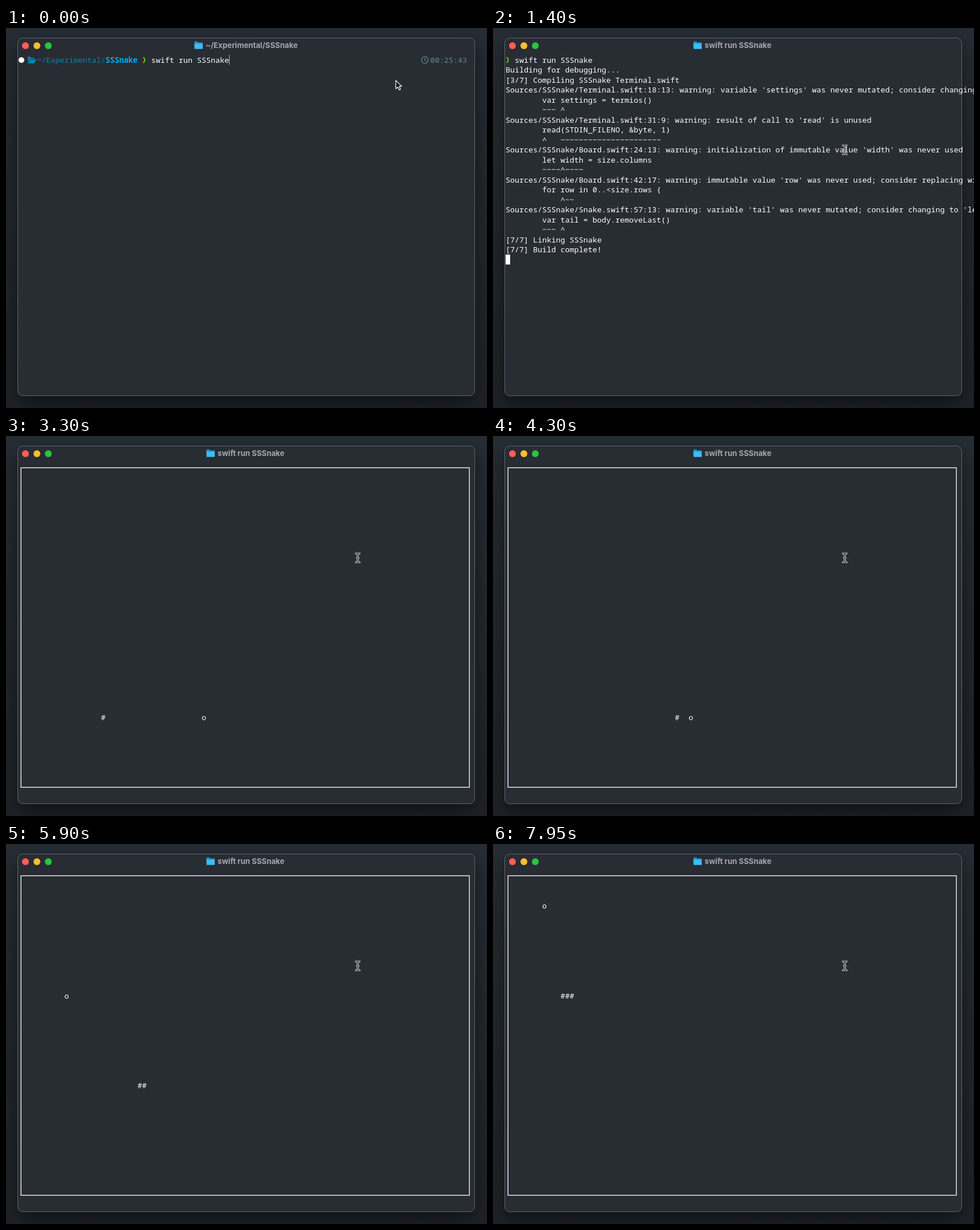
These frames come from a looping animation (841x666 px, 8 s). An HTML page with a canvas:

```html
<!DOCTYPE html>
<html lang="en">
<head>
<meta charset="utf-8">
<title>Terminal snake</title>
<style>
  html, body { margin: 0; width: 100%; height: 100%; overflow: hidden; background: #1f2429; }
  canvas { display: block; }
</style>
</head>
<body>
<canvas id="stage" width="841" height="666"></canvas>
<script>
const ctx = document.getElementById('stage').getContext('2d');
const LOOP = 8000, TICK = 50, STEP = 52.75;
const CELL_W = 8, CELL_H = 17.5, LEFT = 22, BASE = 60.7;
const MONO = '13.333px "Noto Sans Mono", monospace';
const UI = '700 13.2px Inter, sans-serif';
const BLUE = '#0087af', GREEN = '#5fd700', TEAL = '#5f8787';

const colX = col => LEFT + col * CELL_W;

function text(string, col, row, color = '#fff', weight = '') {
  ctx.font = `${weight} ${MONO}`;
  ctx.fillStyle = color;
  ctx.fillText(string, colX(col), BASE + row * CELL_H);
}

function rounded(x, y, w, h, r) {
  ctx.beginPath();
  ctx.roundRect(x, y, w, h, r);
}

function dot(x, y, r, color) {
  ctx.fillStyle = color;
  ctx.beginPath();
  ctx.arc(x, y, r, 0, Math.PI * 2);
  ctx.fill();
}

function line(path, color, width) {
  ctx.strokeStyle = color;
  ctx.lineWidth = width;
  ctx.stroke(new Path2D(path));
}

function fill(path, color) {
  ctx.fillStyle = color;
  ctx.fill(new Path2D(path));
}

function drawWindow() {
  const desk = ctx.createLinearGradient(0, 0, 0, 666);
  desk.addColorStop(0, '#262d34');
  desk.addColorStop(1, '#1f2327');
  ctx.fillStyle = desk;
  ctx.fillRect(0, 0, 841, 666);

  ctx.save();
  ctx.shadowColor = 'rgba(0,0,0,.55)';
  ctx.shadowBlur = 36;
  ctx.shadowOffsetY = 12;
  ctx.fillStyle = '#282c33';
  rounded(20.5, 17.5, 799, 627, 9);
  ctx.fill();
  ctx.restore();
  ctx.strokeStyle = '#62676b';
  ctx.lineWidth = 1;
  ctx.stroke();

  ['#ff5f57', '#febc2e', '#28c840'].forEach((color, i) => dot(34 + 20 * i, 31, 6, color));
}

function drawTitle(title, x) {
  ctx.save();
  ctx.translate(x - 19.5, 23.5);
  fill('M0 1.5Q0 0 1.5 0H5L6.5 1.7H13Q14.5 1.7 14.5 3V8H0Z', '#1a95d6');
  fill('M0 4H14.5V12Q14.5 13.3 13.2 13.3H1.3Q0 13.3 0 12Z', '#43b9f2');
  ctx.restore();
  ctx.font = UI;
  ctx.fillStyle = '#a5a8ab';
  ctx.fillText(title, x, 35);
}

function chevron(col) {
  ctx.save();
  ctx.translate(colX(col), 0);
  line('M2 51.5Q5.6 54 4.4 56Q5 58.5 2 61', GREEN, 1.9);
  ctx.restore();
}

function blockCursor(col, row) {
  ctx.fillStyle = '#fff';
  ctx.fillRect(colX(col), 47 + row * CELL_H, CELL_W, CELL_H);
}

function drawPrompt(showCaret) {
  dot(27, 56.3, 5, '#fff');
  fill('M38 60V51.5Q38 50.3 39.2 50.3H42.5L44 52H48.3Q49.5 52 49.5 53.2V54H42Q41 54 40.4 55Z', BLUE);
  fill('M41.5 55H53L50 61Q49.5 62 48.5 62H38Z', BLUE);
  text('~', 4, 0, BLUE, '700');
  text('/Experimental/', 5, 0, BLUE);
  text('SSSnake', 19, 0, '#00afff', '700');
  chevron(27);
  text('swift run SSSnake', 29, 0);
  line('M738.3 56A5.8 5.8 0 1 1 726.7 56A5.8 5.8 0 1 1 738.3 56M732.5 52V56.5L735.5 58', TEAL, 1.3);
  text('00:25:43', 90, 0, TEAL);
  if (showCaret) {
    ctx.fillStyle = '#b9bcc0';
    ctx.fillRect(390, 47, 1, 17.5);
  }
}

const warning = (file, spot, message, code, mark) => [
  `Sources/SSSnake/${file}.swift:${spot}: warning: ${message}`,
  `        ${code}`,
  `        ${mark}`,
];
const compilerOutput = [
  ...warning('Terminal', '18:13', "variable 'settings' was never mutated; consider changing to 'let' constant",
    'var settings = termios()', '~~~ ^'),
  ...warning('Terminal', '31:9', "result of call to 'read' is unused",
    'read(STDIN_FILENO, &byte, 1)', '^   ~~~~~~~~~~~~~~~~~~~~~~'),
  ...warning('Board', '24:13', "initialization of immutable value 'width' was never used",
    'let width = size.columns', '~~~~^~~~~'),
  ...warning('Board', '42:17', "immutable value 'row' was never used; consider replacing with '_'",
    'for row in 0..<size.rows {', '    ^~~'),
  ...warning('Snake', '57:13', "variable 'tail' was never mutated; consider changing to 'let' constant",
    'var tail = body.removeLast()', '~~~ ^'),
];

function drawBuild(t) {
  chevron(0);
  text('swift run SSSnake', 2, 0);
  if (t < 850) return blockCursor(0, 1);

  const lines = ['Building for debugging...'];
  if (t >= 1150) {
    lines.push('[3/7] Compiling SSSnake Terminal.swift', ...compilerOutput);
    if (t >= 1400) lines.push('[7/7] Linking SSSnake', '[7/7] Build complete!', '');
    else if (t >= 1200) lines.push('[6/7] Compiling SSSnake GameRendering.swift');
  } else if (t >= 950) {
    lines.push('[2/7] Write swift-version--58304C5D6DBC2206.txt');
  } else if (t >= 900) {
    lines.push('[1/7] Write sources');
  }
  lines.forEach((string, i) => text(string, 0, i + 1));
  blockCursor(lines.at(-1).length, lines.length);
}

// Corners of the snake's route, expanded to one cell per step.
const corners = [[6, 5], [14, 5], [14, 25], [45, 25], [45, 21], [6, 21], [6, 11], [7, 11], [7, 12], [14, 12]];
const route = [corners[0]];
for (const [col, row] of corners.slice(1)) {
  let [c, r] = route.at(-1);
  while (c !== col || r !== row) {
    c += Math.sign(col - c);
    r += Math.sign(row - r);
    route.push([c, r]);
  }
}
const foods = [[40, 25], [10, 12], [8, 3]];
const meals = foods.slice(0, 2).map(([col, row]) => route.findIndex(([c, r]) => c === col && r === row));

function drawGame(t) {
  ctx.strokeStyle = '#fff';
  ctx.lineWidth = 1.3;
  ctx.strokeRect(26.2, 55.6, 784, 560);

  const head = Math.min(route.length - 1, Math.floor((t - 2200) / STEP + 12.05));
  const eaten = meals.filter(step => head >= step).length;
  text('o', ...foods[eaten]);
  for (const cell of route.slice(Math.max(0, head - eaten), head + 1)) text('#', ...cell);
}

// Pointer stops: time, x, y.
const stops = [[0, 681, 91], [50, 676, 108], [150, 630, 205], [200, 617, 227], [250, 616, 220],
  [400, 616, 220], [650, 615, 213.5], [LOOP, 615, 213.5]];

function drawPointer(t) {
  const next = stops.findIndex(stop => stop[0] > t);
  const [t0, x0, y0] = stops[next - 1], [t1, x1, y1] = stops[next];
  const k = (t - t0) / (t1 - t0);
  ctx.save();
  ctx.translate(x0 + (x1 - x0) * k, y0 + (y1 - y0) * k);
  ctx.lineJoin = ctx.lineCap = 'round';
  if (t < 100) {
    const arrow = 'M.5 .8V15.5L4 12.4L6.3 17.6L8.8 16.5L6.5 11.3H11Z';
    fill(arrow, '#15181b');
    line(arrow, '#fff', 1.2);
  } else {
    const beam = 'M-3.3 -7.8Q0 -7.8 0 -4.5V4.5Q0 7.8 -3.3 7.8M3.3 -7.8Q0 -7.8 0 -4.5M0 4.5Q0 7.8 3.3 7.8M-1.4 0H1.4';
    line(beam, '#e8e9ea', 3);
    line(beam, '#202429', 1.2);
  }
  ctx.restore();
}

function render(now) {
  const t = Math.floor((now % LOOP) / TICK) * TICK;
  drawWindow();
  if (t < 500) drawTitle('~/Experimental/SSSnake', 349);
  else drawTitle('swift run SSSnake', 370);

  if (t < 450) drawPrompt(t < 150);
  else if (t < 1600) drawBuild(t);
  else drawGame(t);

  drawPointer(t);
}

const start = performance.now();
function loop() {
  render(performance.now() - start);
  requestAnimationFrame(loop);
}
loop();
</script>
</body>
</html>
```
